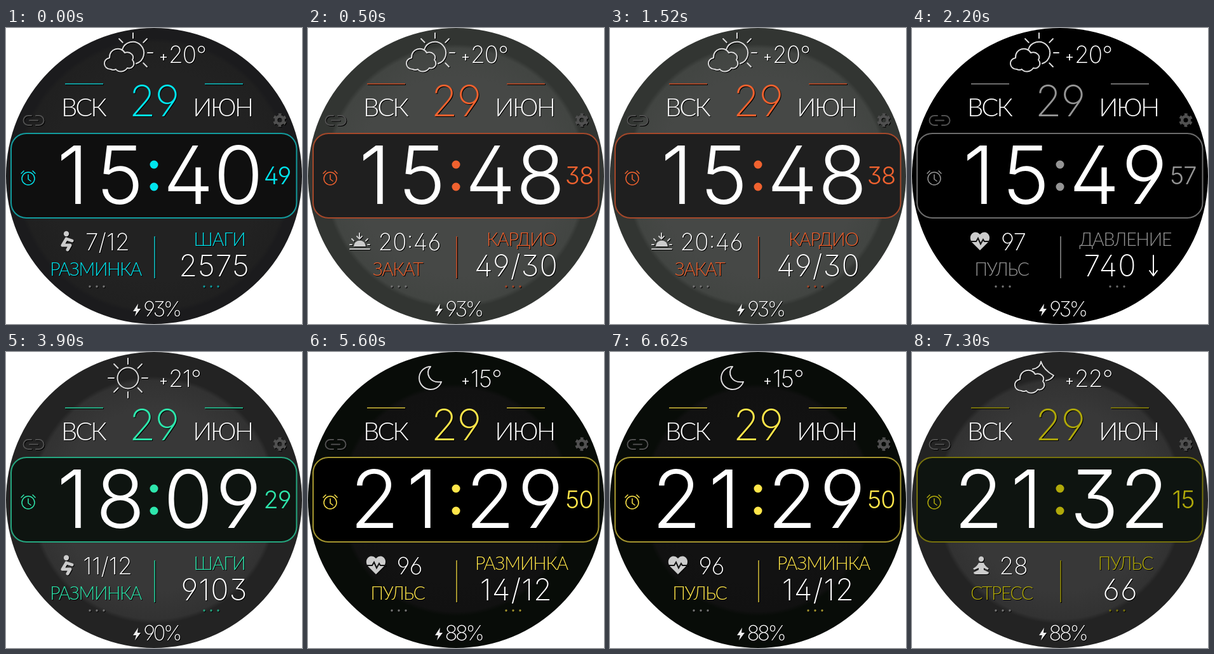
An HTML page for the animation above (8000 ms loop, 466 px wide and 466 px high).

```html
<!DOCTYPE html>
<html lang="ru">
<head>
<meta charset="utf-8">
<title>Watch face</title>
<style>
html, body { margin: 0; height: 100%; overflow: hidden; background: #fff; }
svg { display: block; width: 100vw; height: 100vh; font-family: Lato, Inter, sans-serif; font-weight: 300; }
.num { font-family: Inter, sans-serif; font-weight: 200; font-feature-settings: "ss01", "cv03", "cv04"; }
.big { font-weight: 300; }
.shade { filter: drop-shadow(1.5px 1.5px 0 #000); }
.line { fill: none; stroke-width: 2; stroke-linecap: round; stroke-linejoin: round; }
</style>
</head>
<body>
<svg id="face" viewBox="0 0 466 466"></svg>
<script>
const LOOP = 8000;
const cyan = { accent: '#00e5ee', dim: '#129b9d', panel: '#0f0f0f', bg: ['#222222', '#202020', '#1b1b1d'], ring: 212 };
const orange = { accent: '#f0622f', dim: '#a5482a', panel: '#1f1f1f', bg: ['#464846', '#424542', '#323532'], ring: 203 };
const grey = { accent: '#959595', dim: '#6c6c6c', panel: '#000', bg: ['#000', '#000', '#000'], ring: 200 };
const mint = { accent: '#2ee6ac', dim: '#25a780', panel: '#0e1410', bg: ['#383838', '#323232', '#232323'], ring: 190 };
const yellow = { accent: '#ffe64a', dim: '#a4952f', panel: '#000', bg: ['#121212', '#111111', '#080c08'], ring: 178 };
const olive = { accent: '#b0a90a', dim: '#77720c', panel: '#0e1410', bg: ['#383838', '#323232', '#232323'], ring: 190 };

const scenes = [
  { at: 0, look: cyan, time: '1540', sec: '49', sky: 'partly', temp: '20', power: 93,
    left: ['squat', '7/12', 'РАЗМИНКА'], right: ['ШАГИ', '2575'] },
  { at: 500, look: orange, time: '1548', sec: '38', sky: 'partly', temp: '20', power: 93,
    left: ['sunset', '20:46', 'ЗАКАТ'], right: ['КАРДИО', '49/30'] },
  { at: 2200, look: grey, time: '1549', sec: '57', sky: 'partly', temp: '20', power: 93,
    left: ['heart', '97', 'ПУЛЬС'], right: ['ДАВЛЕНИЕ', '740', true] },
  { at: 3900, look: mint, time: '1809', sec: '29', sky: 'sun', temp: '21', power: 90,
    left: ['squat', '11/12', 'РАЗМИНКА'], right: ['ШАГИ', '9103'] },
  { at: 5600, look: yellow, time: '2129', sec: '50', sky: 'moon', temp: '15', power: 88,
    left: ['heart', '96', 'ПУЛЬС'], right: ['РАЗМИНКА', '14/12'] },
  { at: 7300, look: olive, time: '2132', sec: '15', sky: 'cloudyNight', temp: '22', power: 88,
    left: ['lotus', '28', 'СТРЕСС'], right: ['ПУЛЬС', '66'] }
];

const text = (s, x, y, size, fill, gap = 0, cls = '') =>
  `<text x="${x}" y="${y}" font-size="${size}" fill="${fill}" letter-spacing="${gap}" text-anchor="middle" class="${cls}">${s}</text>`;
const num = (s, x, y, size, fill, gap, cls = '') => text(s, x, y, size, fill, gap, 'num ' + cls);
const path = (d, more = '') => `<path d="${d}" ${more}/>`;
const dot = (x, y, r, more = '') => `<circle cx="${x}" cy="${y}" r="${r}" ${more}/>`;
const dots = (x, fill) => [-11, 0, 11].map(d => dot(x + d, 407, 1.7, `fill="${fill}"`)).join('');

function rays(x, y, from, to, first, last) {
  let d = '';
  for (let i = first; i <= last; i++) {
    const c = Math.cos(i * Math.PI / 4), s = Math.sin(i * Math.PI / 4);
    d += `M${x + c * from} ${y + s * from}L${x + c * to} ${y + s * to}`;
  }
  return path(d);
}

const cloud = 'M165 65C153 65 151 49 163 47C162 32 181 28 187 39C196 36 203 44 199 50C205 58 198 65 191 63C186 70 177 70 173 65Q169 67 165 65Z';
const skies = {
  partly: rays(200, 39, 23, 31, -3, 1) +
    path('M183 34A17.5 17.5 0 1 1 205 56') + path(cloud),
  sun: dot(192, 41, 16.5) + rays(192, 41, 22, 31, 0, 7),
  moon: path('M193 23A18 18 0 1 0 210 47Q197 49 191 40Q186 31 193 23Z'),
  cloudyNight: path('M190 27Q202 25 203 15Q207 28 223 37Q219 44 211 45') +
    path(cloud, 'transform="translate(7 -4)"')
};

const icons = {
  squat: dot(95, 324, 4.2) +
    path('M95 332L89 342L101 342L97 349M95 332L104 335', 'fill="none" stroke="#ccc" stroke-width="5" stroke-linecap="round" stroke-linejoin="round"'),
  sunset: path('M72 344A9.5 9.5 0 0 1 91 344Z') +
    path('M66 348H97M81 323V331M77 328L81 332L85 328M69 332L72 335M94 332L91 335M66 341H69M94 341H97', 'class="line" stroke="#ccc"'),
  heart: path('M107 350L94 337C87 326 99 316 107 325C115 316 127 326 120 337Z') +
    path('M91 336H101L104 331L108 340L112 333L114 336H123', 'fill="none" stroke="#111" stroke-width="2"'),
  lotus: dot(109, 326, 4.2) +
    path('M105 332H113Q115 337 121 341L119 343L113 340V343L121 347Q121 350 117 350H101Q97 350 97 347L105 343V340L98 343L96 341Q103 337 105 332Z')
};

function draw({ look, time, sec, sky, temp, power, left, right }) {
  const { accent, dim, panel, bg, ring } = look;
  const [icon, value, label] = left;
  const [title, amount, falling] = right;
  const white = '#fff', edge = ring / 233;
  return `
  <radialGradient id="bg" gradientUnits="userSpaceOnUse" cx="233" cy="233" r="233">
    <stop offset="${edge - .2}" stop-color="${bg[0]}"/><stop offset="${edge - .01}" stop-color="${bg[1]}"/>
    <stop offset="${edge + .02}" stop-color="${bg[2]}"/><stop offset="1" stop-color="${bg[2]}"/>
  </radialGradient>
  ${dot(233, 233, 233, 'fill="url(#bg)"')}
  <rect x="8" y="166" width="449.5" height="133" rx="24" fill="${panel}" stroke="${dim}" stroke-width="2"/>
  <g class="shade">
    <g class="line" stroke="#ddd">${skies[sky]}</g>
    ${path('M243 46H253M248 41V51', 'stroke="#fff" stroke-width="1.7"')}
    <text x="256" y="55" font-size="37" fill="#fff" letter-spacing="-1" class="num">${temp}°</text>
    ${path('M93 88H153M313 88H373M234 328V394', `stroke="${dim}" stroke-width="2"`)}
    ${text('ВСК', 121.5, 139, 40, white, -3)}
    ${num('29', 233, 139, 68, accent, -1)}
    ${text('ИЮН', 341, 139, 40, white, -2.5)}
    <g fill="#ccc">${icons[icon]}</g>
    ${num(value, 160, 350, 37, white, 0)}
    ${text(label, 141, 390, 28.5, accent, -1.5)}
    ${text(title, 336, 343, 28.5, accent, -1.2)}
    ${num(amount, falling ? 312 : 328, 391, 47, white, 1)}
    ${falling ? path('M380 358V389M374 382L380 390L386 382', 'class="line" stroke="#fff"') : ''}
    ${dots(143, '#777')}${dots(323, dim)}
    ${path('M208 434L200 446H205L203 454L212 442H207Z', 'fill="#eee"')}
    ${num(power + '%', 245, 454, 33, white, -3.5)}
    <g class="line" stroke="#505050">
      ${path('M40 138H35A7 7 0 0 0 35 153H40M47 138H52A7 7 0 0 1 52 153H47M37 145.5H50')}
      ${dot(431, 145, 5.8, 'style="stroke-width:4.5"')}
      ${dot(431, 145, 9, 'style="stroke-width:3.5;stroke-linecap:butt" stroke-dasharray="4.71" stroke-dashoffset="7.07"')}
    </g>
  </g>
  <g class="line" stroke="${accent}" style="stroke-width:1.5">
    ${dot(35, 237, 10)}${path('M35 231V238L39 241M24 229L28 225M46 229L42 225')}
  </g>
  ${num(time, '105 180 287 366', 277, 126, white, 0, 'big')}
  ${dot(233, 215, 6.5, `fill="${accent}"`)}${dot(233, 250, 6.5, `fill="${accent}"`)}
  ${num(sec, 427, 246, 38, accent, -1, 'big')}`;
}

const face = document.getElementById('face');
let shown;
function tick(now) {
  const scene = scenes.findLast(s => s.at <= now % LOOP);
  if (scene !== shown) face.innerHTML = draw(shown = scene);
  requestAnimationFrame(tick);
}
tick(0);
</script>
</body>
</html>
```
